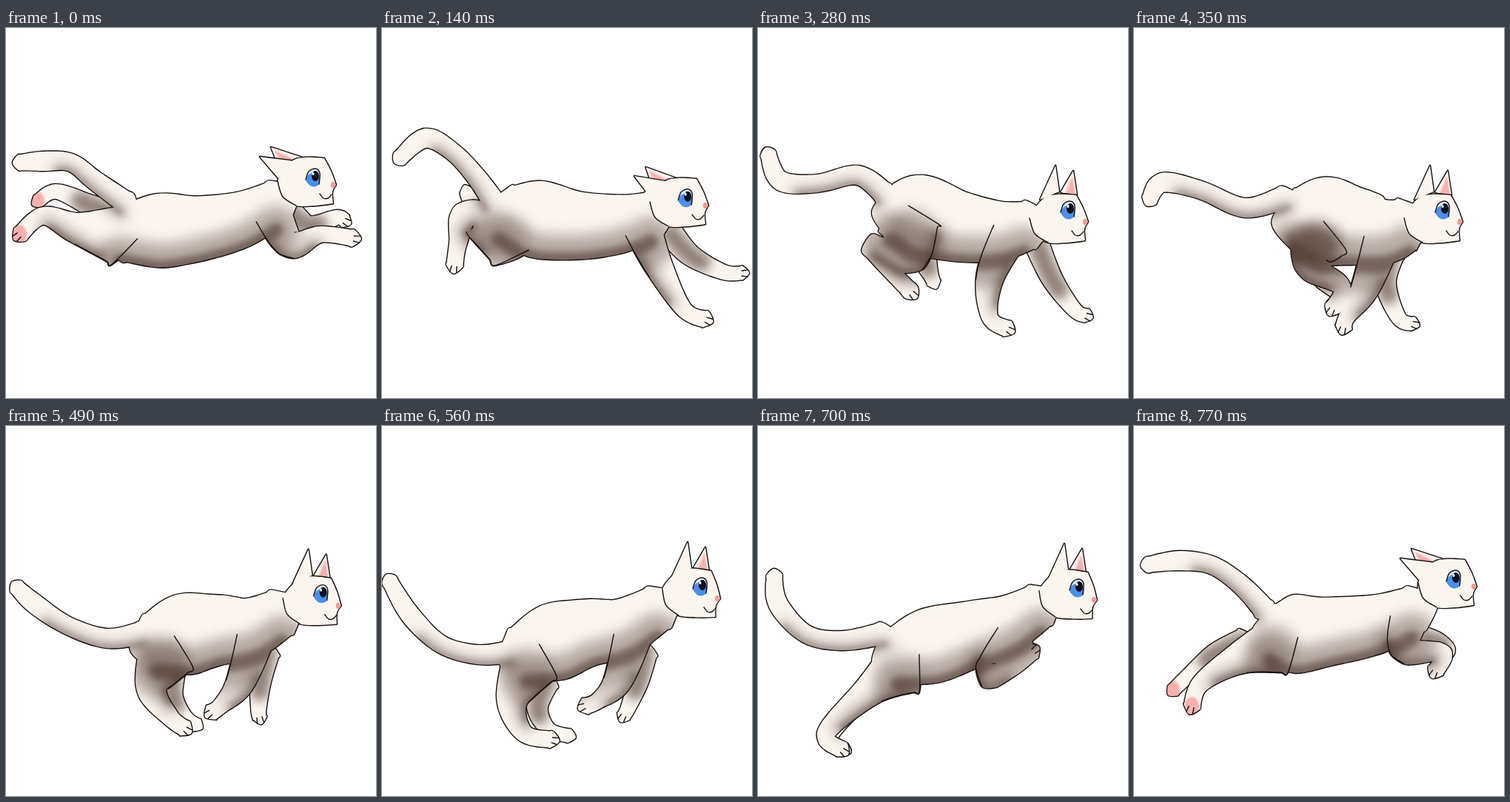
These frames come from a looping animation (500 by 500 pixels, 840 ms). An HTML page with a canvas:

```html
<!DOCTYPE html>
<html lang="en">
<head>
<meta charset="utf-8">
<title>Running cat</title>
<style>
html, body { margin: 0; width: 100%; height: 100%; overflow: hidden; background: #fff; }
canvas { display: block; width: 100vw; height: 100vh; }
</style>
</head>
<body>
<canvas id="stage" width="500" height="500"></canvas>
<script>
const SIZE = 500, STEP = 70;
const INK = '#17110f', FUR = '#fbf5f0', PINK = '#f6b0b0';
const brown = alpha => `rgba(74, 54, 45, ${alpha})`;

// Half-widths along each part, from its first joint to its last.
const GIRTH = {
  spine: [36, 52, 46, 39, 30],
  tail: [10, 13, 12, 13, 15],
  hind: [40, 21, 12, 11],
  fore: [26, 19, 11, 11],
  hind2: [17, 14, 10, 9],
  fore2: [17, 14, 10, 9]
};

// A pose is a skeleton: joints of every part, the nose, head tilt and ear lean.
const leap = {
  nose: '442,212', tilt: '0', lean: '1',
  tail: '16,182 50,180 88,182 120,206 165,238',
  spine: '150,280 205,274 260,271 320,258 372,232',
  hind: '150,280 95,270 50,254 18,280', hind2: '150,252 115,240 68,221 42,235',
  fore: '358,245 385,292 425,279 470,284', fore2: '385,250 410,268 447,256 459,261'
};
const reach = {
  nose: '437,240', tilt: '0', lean: '.95',
  tail: '22,178 58,149 95,167 128,202 153,238',
  spine: '165,250 207,258 265,267 325,264 372,250',
  hind: '174,286 115,254 103,290 98,322', hind2: '150,252 135,250 118,230 114,220',
  fore: '350,265 373,320 408,380 438,394', fore2: '390,278 418,308 462,330 488,331'
};
const land = {
  nose: '442,262', tilt: '0', lean: '0',
  tail: '13,168 30,206 80,210 135,199 172,225',
  spine: '180,250 215,252 270,268 325,274 372,265',
  hind: '205,268 205,312 150,293 208,358', hind2: '222,300 228,320 234,335 238,345',
  fore: '345,270 314,335 313,390 338,407', fore2: '372,280 397,338 428,381 445,389'
};
const gather = {
  nose: '440,262', tilt: '0', lean: '0',
  tail: '20,234 38,209 90,219 150,243 205,228',
  spine: '215,262 255,261 298,268 340,274 372,264',
  hind: '248,288 240,322 281,350 268,380', hind2: '230,310 255,338 276,360 268,376',
  fore: '338,280 312,352 288,390 283,405', fore2: '348,305 340,345 358,392 378,400'
};
const push = {
  nose: '453,233', tilt: '.1', lean: '0',
  tail: '9,207 38,255 80,295 130,309 175,305',
  spine: '182,312 230,293 275,280 325,272 378,243',
  hind: '200,320 176,372 192,415 230,424', hind2: '222,345 210,380 225,410 254,419',
  fore: '340,280 318,345 292,371 274,379', fore2: '355,305 346,345 333,380 326,393'
};
const launch = {
  nose: '454,235', tilt: '.1', lean: '0',
  tail: '22,200 27,240 65,281 115,290 170,280',
  spine: '178,315 230,298 290,281 340,266 385,240',
  hind: '195,325 150,358 92,415 114,438', hind2: '160,355 125,382 95,425 118,438',
  fore: '350,280 312,335 345,326 372,304', fore2: '345,312 355,310 364,306 370,301'
};
const soar = {
  nose: '459,217', tilt: '0', lean: '1',
  tail: '16,188 60,182 105,188 145,215 178,250',
  spine: '185,280 215,281 260,278 330,267 385,245',
  hind: '195,295 140,315 90,348 78,380', hind2: '150,290 110,308 75,336 52,358',
  fore: '372,258 366,302 418,306 407,332', fore2: '390,288 410,293 424,302 420,310'
};

const CYCLE = [
  [leap], [leap, reach, .5], [reach], [reach, land, .5], [land], [gather],
  [gather, push, 1 / 3], [gather, push, 2 / 3], [push], [push, launch, .5], [launch], [soar]
];

const lerp = (a, b, k) => a + (b - a) * k;
const parse = text => text.split(' ').map(p => p.split(',').map(Number));
const along = (p, d, a, n = [0, 0], b = 0) => [p[0] + d[0] * a + n[0] * b, p[1] + d[1] * a + n[1] * b];

function makePose([from, to = from, k = 0]) {
  const pose = {};
  for (const key in from) {
    const a = parse(from[key]), b = parse(to[key]);
    pose[key] = a.map((p, i) => p.map((v, c) => lerp(v, b[i][c], k)));
  }
  return pose;
}

// Position on a Catmull-Rom spline, u from 0 to 1.
function spline(pts, u) {
  const last = pts.length - 1, i = Math.min(last - 1, Math.floor(u * last)), f = u * last - i;
  const [a, b, c, d] = [-1, 0, 1, 2].map(o => pts[Math.max(0, Math.min(last, i + o))]);
  return b.map((v, j) => v + f / 2 * (c[j] - a[j]
    + f * (2 * a[j] - 5 * v + 4 * c[j] - d[j] + f * (3 * (v - c[j]) + d[j] - a[j]))));
}

// Smooth curve through the points; a third value marks a sharp corner.
function curve(pts, closed = true) {
  const path = new Path2D(), n = pts.length;
  const at = i => closed ? pts[(i + n) % n] : pts[Math.max(0, Math.min(n - 1, i))];
  const tangent = i => at(i)[2] ? [0, 0] : [0, 1].map(c => (at(i + 1)[c] - at(i - 1)[c]) / 6);
  path.moveTo(pts[0][0], pts[0][1]);
  for (let i = 0; i < (closed ? n : n - 1); i++) {
    const p = at(i), q = at(i + 1), s = tangent(i), t = tangent(i + 1);
    path.bezierCurveTo(p[0] + s[0], p[1] + s[1], q[0] - t[0], q[1] - t[1], q[0], q[1]);
  }
  if (closed) path.closePath();
  return path;
}

// Tapered tube around a chain of joints, with rounded ends.
function tube(joints, girth, scale = 1) {
  const N = 16, mid = [], rear = [], front = [], dirs = [], widths = girth.map(w => [w * scale]);
  for (let i = 0; i <= N; i++) {
    const u = i / N, p = spline(joints, u), [r] = spline(widths, u);
    const a = spline(joints, Math.max(0, u - .02)), b = spline(joints, Math.min(1, u + .02));
    const len = Math.hypot(b[0] - a[0], b[1] - a[1]) || 1;
    const d = [(b[0] - a[0]) / len, (b[1] - a[1]) / len], n = [-d[1], d[0]];
    mid.push(p);
    dirs.push(d);
    rear.push(along(p, n, r));
    front.push(along(p, n, -r));
  }
  const head = along(mid[0], dirs[0], -.7 * girth[0] * scale);
  const tip = along(mid[N], dirs[N], .9 * girth.at(-1) * scale);
  const path = curve([head, ...rear, tip, ...[...front].reverse()]);
  const part = (list, from, to) => list.slice(Math.round(from * N), Math.round(to * N) + 1);
  return { path, mid, rear, front, head, tip, dir: dirs[N], part, girth: girth[1] * scale };
}

function headShape([x, y], tilt, lean) {
  const c = Math.cos(tilt), s = Math.sin(tilt);
  const turn = ([px, py, corner]) => [x + px * c - py * s, y + px * s + py * c, corner];
  const skull = [[-57, -31], [-38, -37], [-12, -36, 1], [-3, -19], [4, 0, 1], [-1, 10], [0, 25, 1],
    [-24, 28], [-50, 28], [-68, 16], [-75, -5]].map(turn);
  const ear = (up, back) => curve(up.map((p, i) =>
    [x + lerp(p[0], back[i][0], lean), y + lerp(p[1], back[i][1], lean), 1]));
  return {
    skull: curve(skull),
    jaw: curve(skull.slice(8), false),
    ear: ear([[-61, -30], [-40, -76], [-35, -41]], [[-74, -9], [-99, -38], [-52, -32]]),
    ear2: ear([[-33, -40], [-16, -69], [-11, -36]], [[-74, -26], [-84, -51], [-38, -36]]),
    inner: ear([[-27, -38], [-17, -62], [-13, -37]], [[-70, -30], [-80, -47], [-52, -34]])
  };
}

function newCanvas() {
  const c = document.createElement('canvas');
  c.width = c.height = SIZE;
  const g = c.getContext('2d');
  g.lineJoin = g.lineCap = 'round';
  g.strokeStyle = INK;
  return g;
}

// Merged silhouette: shade() paints inside it, ink runs only around the outside.
function drawLayer(g, paths, shade) {
  const layer = newCanvas();
  layer.fillStyle = FUR;
  paths.forEach(p => layer.fill(p));
  layer.globalCompositeOperation = 'source-atop';
  shade(layer);
  layer.filter = 'none';
  layer.globalCompositeOperation = 'destination-over';
  layer.strokeStyle = INK;
  layer.lineWidth = 2.8;
  paths.forEach(p => layer.stroke(p));
  g.drawImage(layer.canvas, 0, 0);
}

function softLine(g, pts, width, blur, alpha) {
  g.filter = `blur(${blur}px)`;
  g.lineWidth = width;
  g.strokeStyle = brown(alpha);
  g.stroke(curve(pts, false));
}

// Wide faint shadow plus a narrow dark one, along the lower edge.
function underside(g, limb, from, to) {
  const height = side => limb.part(limb[side], from, to).reduce((sum, p) => sum + p[1], 0);
  const edge = limb.part(limb[height('rear') > height('front') ? 'rear' : 'front'], from, to);
  softLine(g, edge, limb.girth * 1.3, 9, .38);
  softLine(g, edge, limb.girth * .4, 5, .6);
}

function oval(g, x, y, rx, ry, color) {
  g.fillStyle = color;
  g.beginPath();
  g.ellipse(x, y, rx, ry, 0, 0, 7);
  g.fill();
}

// Pads show only while the hind leg is kicked far back.
function pad(g, leg) {
  const [x, y] = leg.mid.at(-1);
  if (leg.mid[0][0] - x < 90) return;
  g.filter = 'blur(1.5px)';
  oval(g, x, y, 10, 14, PINK);
}

function toes(g, leg) {
  const n = [-leg.dir[1], leg.dir[0]];
  for (const side of [-3, 4]) {
    g.stroke(curve([along(leg.tip, leg.dir, -10, n, side), along(leg.tip, leg.dir, -2, n, side * 1.3)], false));
  }
}

function drawFace(g, [nx, ny], lean) {
  const near = (x, y, list) => list.map(([dx, dy]) => [x + dx, y + dy]);
  const ex = nx - lerp(23, 27, lean), ey = ny - lerp(15, 9, lean);
  const rim = near(ex, ey, [[-10, 2], [-6, -9], [3, -13], [9, -7], [8, 8], [-2, 11]]);
  g.save();
  g.clip(curve(rim));
  oval(g, ex, ey, 16, 16, '#dcebfb');
  oval(g, ex, ey + 4, 10, 11, '#4b8fe8');
  oval(g, ex + 3, ey - 3, 5, 7, '#0b0f1c');
  oval(g, ex, ey - 6, 1.5, 2, '#fff');
  g.restore();
  g.stroke(curve(rim.slice(0, 5), false));
  oval(g, nx, ny, 3, 4, '#ee9a98');
  g.stroke(curve(near(nx, ny, [[-18, 12], [-13, 18], [-7, 18], [-2, 13]]), false));
}

function render(step) {
  const g = newCanvas(), pose = makePose(step);
  const nose = pose.nose[0], lean = pose.lean[0][0];
  const head = headShape(nose, pose.tilt[0][0], lean);
  // A shorter spine is a rounder, darker body.
  const reachLength = pose.spine.slice(1).reduce((sum, p, i) =>
    sum + Math.hypot(p[0] - pose.spine[i][0], p[1] - pose.spine[i][1]), 0);
  const fold = Math.max(0, Math.min(1, (230 - reachLength) / 80));
  const part = {};
  for (const key in GIRTH) {
    part[key] = tube(pose[key], GIRTH[key], key === 'spine' ? Math.sqrt(210 / reachLength) : 1);
  }
  const { spine, tail, hind, hind2, fore, fore2 } = part;

  g.fillStyle = '#fff';
  g.fillRect(0, 0, SIZE, SIZE);

  drawLayer(g, [head.ear2], layer => {
    layer.fillStyle = PINK;
    layer.filter = 'blur(1px)';
    layer.fill(head.inner);
  });

  drawLayer(g, [hind2.path, fore2.path], layer => {
    for (const leg of [hind2, fore2]) softLine(layer, leg.part(leg.mid, 0, .45), 26, 7, .6);
    pad(layer, hind2);
  });
  g.lineWidth = 1.4;
  toes(g, fore2);

  const near = [tail, spine, hind, fore].map(p => p.path);
  drawLayer(g, [...near, head.skull, head.ear], layer => {
    underside(layer, spine, 0, .85);
    underside(layer, tail, .4, 1);
    underside(layer, hind, .1, .55);
    underside(layer, fore, .25, .55);
    layer.filter = 'blur(9px)';
    oval(layer, ...hind.mid[1], 34, 30, brown(fold * .8));
    pad(layer, hind);
    // Keep the face clear of the chest shadow.
    layer.filter = 'blur(1px)';
    layer.fillStyle = FUR;
    layer.fill(head.skull);
  });

  g.lineWidth = 1.4;
  g.stroke(curve([hind.head, ...hind.part(hind.front, 0, .3)], false));
  g.stroke(curve(fore.part(fore.rear, .06, .4), false));
  g.stroke(head.jaw);
  toes(g, hind);
  toes(g, fore);
  drawFace(g, nose, lean);
  return g.canvas;
}

const frames = CYCLE.map(render);
const stage = document.getElementById('stage').getContext('2d');

function play() {
  const i = Math.floor(performance.now() / STEP) % frames.length;
  stage.drawImage(frames[i], 0, 0);
  requestAnimationFrame(play);
}
play();
</script>
</body>
</html>
```
